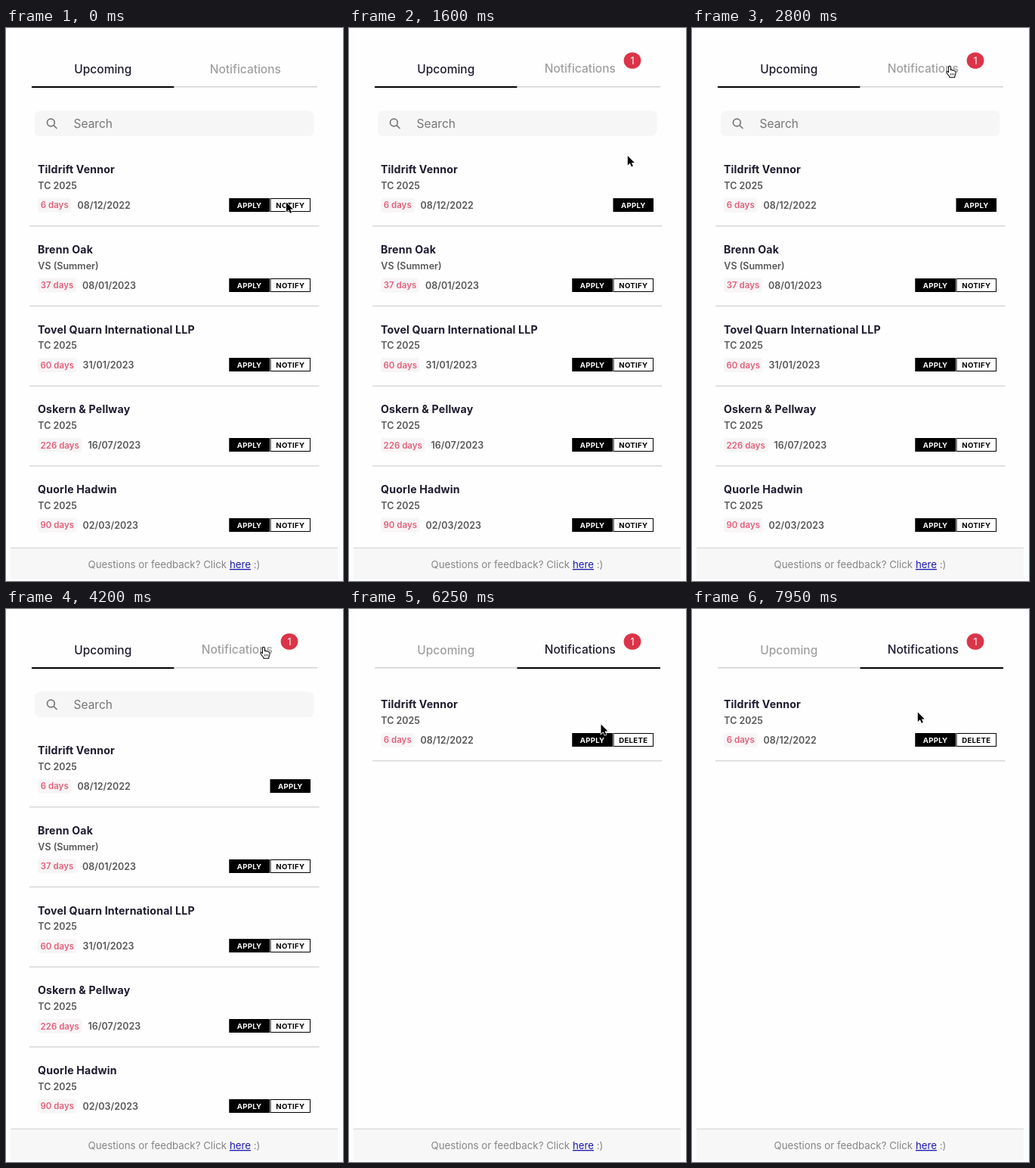
An HTML page that plays this animation: 446x731 px, repeating every 8 s.

```html
<!DOCTYPE html>
<html lang="en">
<head>
<meta charset="utf-8">
<title>Upcoming deadlines</title>
<style>
  html, body { margin: 0; width: 100%; height: 100%; overflow: hidden; background: #fbfdfe; }
  svg { display: block; width: 100%; height: 100%; font-family: Inter, sans-serif; }
  .tab { font-size: 15.5px; font-weight: 500; text-anchor: middle; }
  .search { font-size: 15.5px; fill: #767676; }
  .name { font-size: 14.2px; font-weight: 700; letter-spacing: .15px; fill: #1f1b2e; }
  .info { font-size: 12.5px; font-weight: 600; fill: #585858; }
  .days { font-size: 11.5px; font-weight: 600; fill: #e2617a; text-anchor: middle; }
  .button { font-size: 9.6px; font-weight: 700; letter-spacing: .3px; text-anchor: middle; }
  .count { font-size: 12.5px; fill: #fff; text-anchor: middle; }
  .footer { font-size: 13.28px; fill: #868686; }
  .link { fill: #1c1aae; text-decoration: underline; }
</style>
</head>
<body>
<svg viewBox="0 0 446 731">
  <rect x="6" width="433" height="729" fill="#fefefe"/>
  <text id="upcomingTab" class="tab" x="128.3" y="59.6">Upcoming</text>
  <text id="noticeTab" class="tab">Notifications</text>
  <rect id="upcomingLine" x="34" width="188.5"/>
  <rect id="noticeLine" x="222.5" width="189.5"/>
  <g id="count">
    <ellipse cx="375" cy="43" rx="11.4" ry="10.8" fill="#db3449"/>
    <text class="count" x="375" y="47.5">1</text>
  </g>
  <g id="upcoming">
    <rect x="38" y="109.5" width="369.5" height="33.5" rx="7" fill="#f6f6f6"/>
    <g fill="none" stroke="#777" stroke-width="1.7">
      <circle cx="59.4" cy="125" r="4.9"/>
      <path d="M63 128.6L67.5 133"/>
    </g>
    <text class="search" x="89.5" y="131.7">Search</text>
    <g id="rows"></g>
  </g>
  <g id="notices"></g>
  <rect x="6" y="687" width="433" height="42" fill="#f7f7f7"/>
  <rect x="6" y="686.7" width="433" height="1.2" fill="#d6d6d6"/>
  <text class="footer" x="108.5" y="714">Questions or feedback? Click <tspan class="link">here</tspan> :)</text>
  <path id="arrow" d="M0 0V12.5L3 9.8L5 14.3L7 13.4L5.1 9H9Z" stroke="#fff" stroke-width="1.5" paint-order="stroke"/>
  <g id="hand">
    <g transform="scale(.92)" stroke="#000" stroke-width="1.1" stroke-linejoin="round">
      <path fill="#fff" d="M-1.6 9V1.4Q-1.6 -.2 0 -.2Q1.5 -.2 1.5 1.4V5.5Q3.4 4.6 4 6Q6 5.2 6.6 6.8Q8.6 6.4 8.6 8.5V10.5Q8.6 12.5 7.4 14V16H-.2V14.5Q-2 13 -3.6 10.6Q-5 8.4 -4.4 7.8Q-3.2 6.6 -1.6 9Z"/>
      <path stroke-width=".8" d="M1.6 10V13M3.8 10V13M6 10V13"/>
    </g>
  </g>
</svg>
<script>
const LOOP = 8000, STEP = 50, NOTIFY_AT = 300, SWITCH_AT = 4850;
const ROW_PITCH = 105.7;
const $ = id => document.getElementById(id);

function button(label, x, y, dark) {
  return `<rect x="${x + .5}" y="${y + .5}" width="52.5" height="17" fill="${dark ? '#000' : '#fff'}" stroke="#000"/>
    <text class="button" x="${x + 26.8}" y="${y + 12.6}" fill="${dark ? '#fff' : '#000'}">${label}</text>`;
}

// A row is laid out from the vertical centre of its name.
function row([name, type, days, date, tagWidth], y, buttons, divider = true) {
  return `<text class="name" x="42" y="${y + 5}">${name}</text>
    <text class="info" x="42.3" y="${y + 25.7}">${type}</text>
    <rect x="42" y="${y + 37.5}" width="${tagWidth}" height="19" rx="4" fill="#f8f5f6"/>
    <text class="days" x="${42 + tagWidth / 2}" y="${y + 51.2}">${days} days</text>
    <text class="info" x="${50 + tagWidth}" y="${y + 51.6}">${date}</text>
    ${buttons}
    ${divider ? `<rect x="31" y="${y + 73.9}" width="383.5" height="1.3" fill="#d3d3d3"/>` : ''}`;
}

const pair = (second, y) => button('APPLY', 295.3, y, true) + button(second, 349.5, y, false);

const firms = [
  ['Tildrift Vennor', 'TC 2025', 6, '08/12/2022', 44.5],
  ['Brenn Oak', 'VS (Summer)', 37, '08/01/2023', 51],
  ['Tovel Quarn International LLP', 'TC 2025', 60, '31/01/2023', 51.5],
  ['Oskern &amp; Pellway', 'TC 2025', 226, '16/07/2023', 58.5],
  ['Quorle Hadwin', 'TC 2025', 90, '02/03/2023', 51.5]
];

$('rows').innerHTML = firms.map((firm, i) => {
  const y = 187.2 + i * ROW_PITCH, top = Math.round(y + 37.7);
  const buttons = i ? pair('NOTIFY', top)
    : `<g id="before">${pair('NOTIFY', top)}</g><g id="after">${button('APPLY', 349.5, top, true)}</g>`;
  return row(firm, y, buttons, i < firms.length - 1);
}).join('');
$('notices').innerHTML = row(firms[0], 126.2, pair('DELETE', 164));

// Pointer stops: time, x, y and the easing used to get there.
const linear = p => p;
const easeIn = p => p ** 1.3;
const easeOut = p => 1 - (1 - p) ** 2;
const stops = [
  [0, 371, 230.5, linear],
  [1150, 371, 230.5, linear],
  [2000, 366, 90, easeIn],
  [2150, 358.3, 58.5, linear],
  [2800, 341, 50.5, easeOut],
  [5800, 341, 50.5, linear],
  [6250, 333.5, 152.5, easeIn],
  [6450, 327.5, 172.5, easeOut],
  [7750, 327.5, 172.5, linear],
  [7950, 298.8, 136.5, easeOut],
  [LOOP, 298.8, 136.5, linear]
];

function pointerAt(t) {
  const i = stops.findIndex(stop => stop[0] > t);
  const [t0, x0, y0] = stops[i - 1], [t1, x1, y1, ease] = stops[i];
  const p = ease((t - t0) / (t1 - t0));
  return [x0 + (x1 - x0) * p, y0 + (y1 - y0) * p];
}

const show = (id, on) => $(id).setAttribute('visibility', on ? 'visible' : 'hidden');

function set(id, attributes) {
  for (const key in attributes) $(id).setAttribute(key, attributes[key]);
}

function styleTab(name, active) {
  set(name + 'Tab', { fill: active ? '#1f1b2e' : '#a0a0a0' });
  set(name + 'Line', active
    ? { y: 77, height: 2, fill: '#000' }
    : { y: 77, height: 1.4, fill: '#d0d0d0' });
}

function draw(t) {
  const notified = t >= NOTIFY_AT, switched = t >= SWITCH_AT;
  styleTab('upcoming', !switched);
  styleTab('notice', switched);
  set('noticeTab', notified ? { x: 305.8, y: 58.7 } : { x: 316.8, y: 59.6 });
  show('count', notified);
  // Display hides whole lists, including children with their own visibility.
  $('upcoming').style.display = switched ? 'none' : '';
  $('notices').style.display = switched ? '' : 'none';
  show('before', !notified);
  show('after', notified);

  const [x, y] = pointerAt(t), overTab = y < 80;
  for (const id of ['arrow', 'hand']) set(id, { transform: `translate(${x} ${y})` });
  show('arrow', !overTab);
  show('hand', overTab);
}

const start = performance.now();
function tick() {
  const elapsed = (performance.now() - start) % LOOP;
  draw(Math.floor(elapsed / STEP) * STEP);
  requestAnimationFrame(tick);
}
tick();
</script>
</body>
</html>
```
